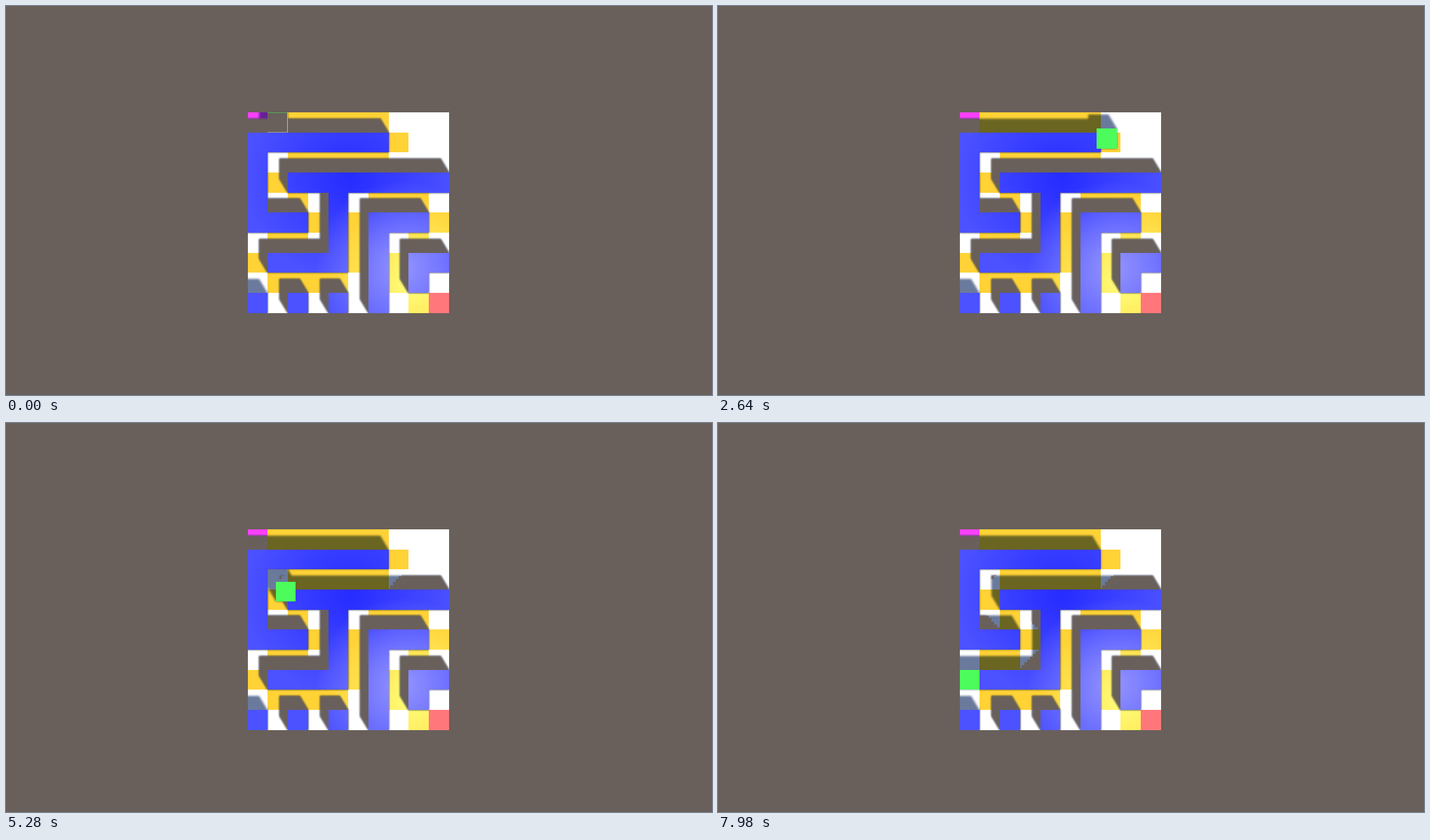
Recreate the animation shown at these times as an HTML page with a canvas. Size 1007 by 556 pixels, loop 8 s.

```html
<!DOCTYPE html>
<html lang="en">
<head>
<meta charset="utf-8">
<title>Maze walk</title>
<style>
html, body { margin: 0; width: 100%; height: 100%; overflow: hidden; background: #69605b; }
canvas { display: block; }
</style>
</head>
<body>
<canvas id="stage" width="1007" height="556"></canvas>
<script>
const LOOP = 8000, TICK = 60, UNIT_MS = 300;
const W = 1007, H = 556, LEFT = 344.7, TOP = 151.8, CELL = 28.7;
const BG = '#69605b', SHADE = '#6a7a9c', CAST_X = 12, CAST_Y = 20;

// # wall, y path, s start, e exit
const MAP = [
  'syyyyyy...',
  '#######y..',
  '#.yyyyy...',
  '#y########',
  '#.y.#.yyy.',
  '###y#y###y',
  '.yy.#y#.y.',
  'y####y#y##',
  '.yyyy.#y#.',
  '#.#.#.#.ye'
];

// Cells visited, and the time at which each is left
const ROUTE = [
  [1, 0], [2, 0], [3, 0], [4, 0], [5, 0], [6, 0], [7, 1], [6, 2], [5, 2],
  [4, 2], [3, 2], [2, 2], [1, 3], [2, 4], [3, 5], [2, 6], [1, 6], [0, 7]
];
const LEAVE = [225, 640, 1056, 1475, 1895, 2293, 2850, 3385, 3800,
  4224, 4630, 5020, 5510, 5990, 6510, 6975, 7385];

const newLayer = () => Object.assign(document.createElement('canvas'), { width: W, height: H }).getContext('2d');
const ctx = document.getElementById('stage').getContext('2d');
const edgeX = c => Math.round(LEFT + c * CELL);
const edgeY = r => Math.round(TOP + r * CELL);

function box(c, r) {
  const x = edgeX(c), y = edgeY(r);
  return [x, y, edgeX(c + 1) - x, edgeY(r + 1) - y];
}

function eachCell(visit) {
  MAP.forEach((row, r) => [...row].forEach((kind, c) => visit(kind, c, r)));
}

function radial(x, y, radius, color, clear) {
  const g = ctx.createRadialGradient(x, y, 0, x, y, radius);
  g.addColorStop(0, color);
  g.addColorStop(1, clear);
  return g;
}

// Outline of a block together with the shadow it throws up and to the left
function addShadow(path, x, y, w, h) {
  const points = [
    [x - CAST_X, y - CAST_Y], [x + w - CAST_X, y - CAST_Y], [x + w, y],
    [x + w, y + h], [x, y + h], [x - CAST_X, y + h - CAST_Y]
  ];
  points.forEach((p, i) => i ? path.lineTo(...p) : path.moveTo(...p));
  path.closePath();
}

const walls = new Path2D(), yellow = new Path2D(), wallShadow = new Path2D();
eachCell((kind, c, r) => {
  if (kind === '#') {
    walls.rect(...box(c, r));
    addShadow(wallShadow, ...box(c, r));
  }
  if (kind === 'y') yellow.rect(...box(c, r));
});
const board = new Path2D();
board.rect(edgeX(0), edgeY(0), edgeX(10) - edgeX(0), edgeY(10) - edgeY(0));

const wallFills = [
  '#4c52ff',
  radial(490, 245, 150, '#262cff', '#262cff00'),
  radial(565, 375, 125, '#9494ff', '#9494ff00')
];
const yellowFills = ['#ffd236', radial(580, 395, 120, '#ffff7c', '#ffff7c00')];

function playerAt(t) {
  let i = LEAVE.length - 1;
  while (i >= 0 && LEAVE[i] > t) i--;
  if (i < 0) return ROUTE[0];
  const [x0, y0] = ROUTE[i], [x1, y1] = ROUTE[i + 1];
  const k = Math.min(1, (t - LEAVE[i]) / (UNIT_MS * Math.hypot(x1 - x0, y1 - y0)));
  return [x0 + (x1 - x0) * k, y0 + (y1 - y0) * k];
}

// Flat grey shadow cores, wiped away wherever the player has passed
const coreBase = newLayer(), core = newLayer(), soft = newLayer();
coreBase.filter = 'blur(0.8px)';
coreBase.fillStyle = BG;
coreBase.fill(wallShadow);
coreBase.filter = 'none';
coreBase.clearRect(...box(0, 8));

function drawCore(t) {
  core.clearRect(0, 0, W, H);
  core.drawImage(coreBase.canvas, 0, 0);
  core.globalCompositeOperation = 'destination-out';
  for (let s = 2 * TICK; s <= t; s += TICK) {
    const b = box(...playerAt(s));
    core.fillRect(...b);
    if (s > LEAVE[15]) {
      const cast = new Path2D();
      addShadow(cast, ...b);
      core.fill(cast);
    }
  }
  core.globalCompositeOperation = 'source-over';
  ctx.drawImage(core.canvas, 0, 0);
}

function drawSoftShadow(player) {
  const all = new Path2D(wallShadow);
  addShadow(all, ...player);
  soft.clearRect(0, 0, W, H);
  soft.filter = 'blur(1.6px)';
  soft.fillStyle = SHADE;
  soft.fill(all);
  soft.filter = 'none';
  ctx.globalCompositeOperation = 'multiply';
  ctx.drawImage(soft.canvas, 0, 0);
  ctx.globalCompositeOperation = 'source-over';
}

function fillAll(path, fills) {
  for (const f of fills) {
    ctx.fillStyle = f;
    ctx.fill(path);
  }
}

function fillBox(b, color) {
  ctx.fillStyle = color;
  ctx.fillRect(...b);
}

function drawPlayer(b, ready) {
  fillBox(b, ready ? '#4cfc5d' : BG);
  if (ready) return;
  const [x, y, w, h] = b;
  fillBox([x, y, w, 1], '#55a65b');
  fillBox([x + w - 1, y, 1, h], '#b5b5a4');
  fillBox([x, y + h - 1, w, 1], '#a09d90');
}

function draw(t) {
  const player = box(...playerAt(t));
  fillBox([0, 0, W, H], BG);
  ctx.save();
  ctx.clip(board);
  fillAll(board, ['#fff']);
  fillAll(yellow, yellowFills);
  fillBox(box(0, 0), '#fa40fc');
  fillBox(box(9, 9), '#ff777b');
  drawSoftShadow(player);
  drawCore(t);
  fillAll(walls, wallFills);
  drawPlayer(player, t >= 2 * TICK);
  ctx.restore();
}

let lastTick = -1;
function frame(now) {
  const t = Math.floor((now % LOOP) / TICK) * TICK;
  if (t !== lastTick) draw(lastTick = t);
  requestAnimationFrame(frame);
}
draw(0);
requestAnimationFrame(frame);
</script>
</body>
</html>
```
